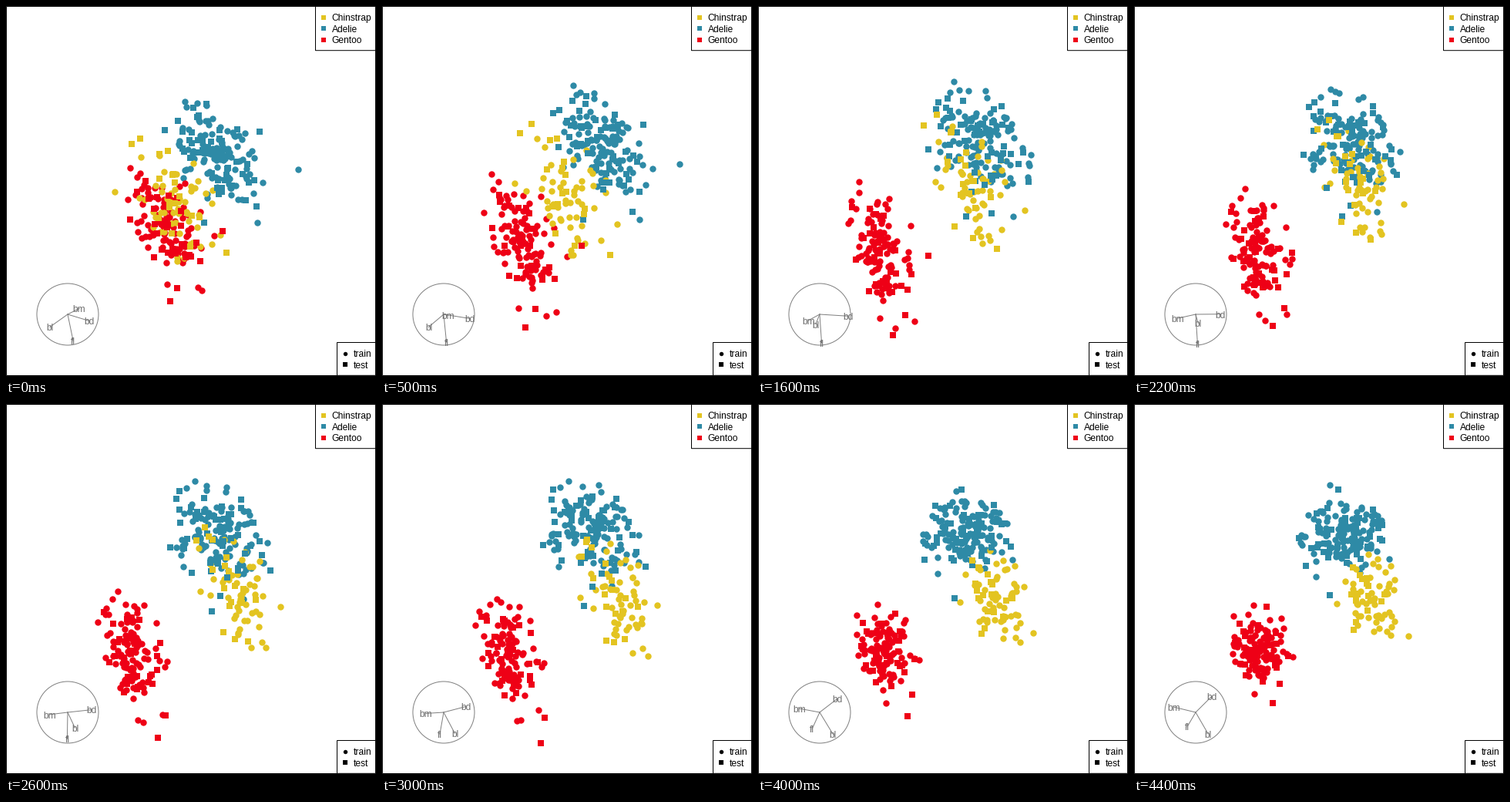
Animation of 480x480 px, one loop 4500 ms. Source, as a matplotlib script:

```python
import numpy as np
import matplotlib.pyplot as plt
from matplotlib.animation import FuncAnimation
from matplotlib.patches import Circle, Rectangle

SIZE, FRAMES, STEP = 480, 45, 100
PX = 0.72  # points per pixel at 100 dpi
FONT = 12 * PX
plt.rcParams["font.family"] = "Liberation Sans"

YELLOW, TEAL, RED, GREY = "#E3C421", "#2E8AA6", "#EE0016", "#707070"
VARS = ["bl", "bd", "fl", "bm"]
CENTER = np.array([43.92, 17.15, 200.92, 4201.75])
SPREAD = np.array([5.46, 1.975, 14.06, 801.95])
HALF_RANGE = 4.218

# Each species: typical bird, spread, shared body-size correlation, a few extremes
SPECIES = {
    "Adelie": dict(
        color=TEAL, n=151, rho=.43,
        mean=[38.8, 18.35, 190, 3700], sd=[2.66, 1.22, 6.5, 459],
        train=[(34.6, 21.1, 198, 4400), (33.1, 16.1, 178, 2900)],
        test=[(46.0, 21.5, 194, 4200), (44.1, 18.0, 210, 4000)]),
    "Gentoo": dict(
        color=RED, n=123, rho=.68,
        mean=[47.5, 14.98, 217, 5076], sd=[3.08, .98, 6.5, 504],
        train=[(54.3, 15.7, 231, 5650)],
        test=[(59.6, 17.0, 230, 6050), (44.4, 17.3, 219, 5250),
              (55.9, 17.0, 228, 5600)]),
    "Chinstrap": dict(
        color=YELLOW, n=68, rho=.58,
        mean=[48.8, 18.42, 196, 3733], sd=[3.34, 1.14, 7.1, 384],
        train=[(58.0, 17.8, 181, 3700), (55.8, 19.8, 207, 4000)],
        test=[(52.0, 20.7, 210, 4800), (40.9, 16.6, 187, 3200)]),
}

# Key planes of the tour: axis tips (x, y up) in pixels, by time in ms
TOUR = {
    0: [(-23, -16.4), (28, -8.4), (7, -34.4), (15, 7.6)],
    1000: [(-13, -14.4), (37, -4.4), (2, -35.4), (-4, -10.4)],
    2200: [(3, -11.4), (32, .6), (2, -38.4), (-23, -5.4)],
    3000: [(14.5, -27.4), (29, 7.6), (-5, -28.4), (-23, -1.4)],
    3600: [(18, -28.4), (25, 14.6), (-9, -24.4), (-24, 2.6)],
    4400: [(16, -27.4), (21, 20.6), (-11, -18.4), (-28, 6.6)],
}
TIPS = np.array(list(TOUR.values())).reshape(len(TOUR), 8)


def standardise(values):
    return (np.array(values) - CENTER) / SPREAD


def flock(n, rho, mean, sd, train, test, rng, **_):
    """Train and test birds: one body-size factor plus independent noise."""
    mu, known = standardise(mean), standardise(train + test)
    m = n - len(known)
    noise = rng.normal(size=(m, 5))
    noise *= np.minimum(1, 2.8 / np.linalg.norm(noise, axis=1, keepdims=True))
    z = np.sqrt(rho) * noise[:, :1] + np.sqrt(1 - rho) * noise[:, 1:]
    z = (z - z.mean(0)) / z.std(0)
    rest = mu - (known - mu).sum(0) / m + .95 * z * sd / SPREAD
    held = rng.random(m) < .25
    return (np.vstack([standardise(train), rest[~held]]),
            np.vstack([standardise(test), rest[held]]))


def plane(ms):
    """Orthonormal 4x2 projection at a given time, y pointing down."""
    raw = [np.interp(ms, list(TOUR), tip) for tip in TIPS.T]
    u, _, vt = np.linalg.svd(np.reshape(raw, (4, 2)), full_matrices=False)
    return u @ vt * [1, -1]


fig = plt.figure(figsize=(SIZE / 100, SIZE / 100), dpi=100, facecolor="white")
ax = fig.add_axes([0, 0, 1, 1])
ax.set(xlim=(0, SIZE), ylim=(SIZE, 0))
ax.axis("off")


def dots(x, y, marker, size, color, z):
    return ax.scatter(x, y, s=(size * PX) ** 2, marker=marker, color=color,
                      linewidths=0, zorder=z)


def box(x, y, z):
    """White panel from (x, y) to the lower right of the stage or a given corner."""
    return Rectangle(x, *y, fc="white", ec="black", lw=PX, zorder=z, snap=False)


def panel(x, y, w, h, z):
    ax.add_patch(Rectangle((x, y), w, h, fc="white", ec="black", lw=PX,
                           zorder=z, snap=False))


def legend(x, y, rows):
    panel(x, y, SIZE - .5 - x, 14.4 * (len(rows) + 1) - .4, 5)
    for i, (label, marker, color) in enumerate(rows, 1):
        row = y + 14.4 * i
        dots(x + 10.6, row, marker, 5.4, color, 6)
        ax.text(x + 21.2, row + 4.3, label, fontsize=FONT, zorder=6)


rng = np.random.default_rng(7)
clouds = []
for spec in SPECIES.values():
    train, test = flock(rng=rng, **spec)
    for data, marker, size, z in ((train, "o", 8.4, 2), (test, "s", 8, 3)):
        clouds.append((data, dots(0, 0, marker, size, spec["color"], z)))

panel(.5, .5, SIZE - 1, SIZE - 1, 0)
legend(401.5, .5, [(name, "s", SPECIES[name]["color"])
                   for name in ("Chinstrap", "Adelie", "Gentoo")])
legend(429.5, 436.5, [("train", "o", "black"), ("test", "s", "black")])

HUB = np.array([80, 400])
ax.add_patch(Circle(HUB, 40, fill=False, ec="#808080", lw=PX, zorder=1))
spokes = [ax.plot([], [], color="#808080", lw=PX, zorder=1)[0] for _ in VARS]
labels = [ax.text(0, 0, v, fontsize=FONT, color=GREY, ha="center", zorder=4)
          for v in VARS]


def update(i):
    proj = plane(i * STEP)
    for data, dot in clouds:
        dot.set_offsets(SIZE / 2 * (1 + data @ proj / HALF_RANGE))
    for tip, spoke, label in zip(HUB + 40 * proj, spokes, labels):
        spoke.set_data(*zip(HUB, tip))
        label.set_position(tip + [0, 4.8])
    return [dot for _, dot in clouds] + spokes + labels


anim = FuncAnimation(fig, update, frames=FRAMES, interval=STEP,
                     repeat=True, repeat_delay=0)
plt.show()
```
